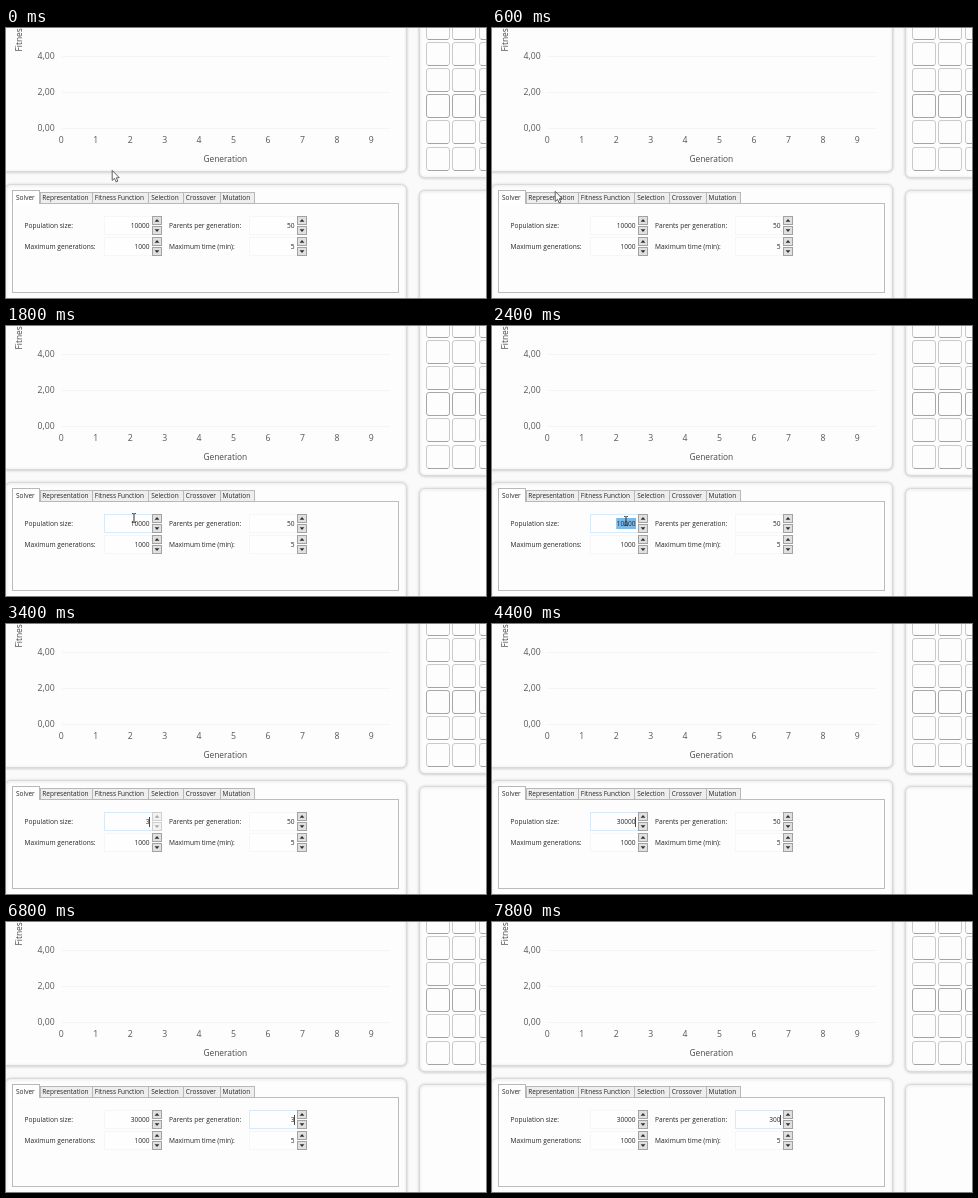
An HTML page with a canvas for the animation above (8 s loop, 480 px wide and 270 px high).

```html
<!DOCTYPE html>
<html lang="en">
<head>
<meta charset="utf-8">
<title>Solver settings</title>
<style>
  html, body { margin: 0; width: 100%; height: 100%; overflow: hidden; background: #fbfbfb; }
  canvas { display: block; width: 480px; height: 270px; }
</style>
</head>
<body>
<canvas id="stage" width="480" height="270"></canvas>
<script>
const ctx = document.getElementById('stage').getContext('2d');
const LOOP = 8000;
const FONT = '"Open Sans", "Noto Sans", sans-serif';

// Each track lists [start ms, value]; values hold until the next entry.
const pointer = [
  [0, ['arrow', 106, 142]], [200, ['arrow', 70, 157]], [400, ['arrow', 65, 161]],
  [600, ['arrow', 63, 163]], [1200, ['arrow', 66, 166]], [1400, ['arrow', 72, 171]],
  [1600, ['arrow', 110, 187]], [1800, ['beam', 128, 187]], [2000, ['beam', 133, 190]],
  [2200, ['beam', 134, 190]], [3400, null], [5200, ['arrow', 146, 193]],
  [5400, ['arrow', 219, 205]], [5600, ['beam', 272, 191]], [6800, null]
];
const population = [[0, '10000'], [3400, '3'], [3800, '30'], [4000, '3000'], [4400, '30000']];
const parents = [[0, '50'], [6800, '3'], [7200, '30'], [7400, '300']];
const popCaret = [[0, false], [3400, true], [4000, false], [4400, true], [5000, false], [5600, true], [5800, false]];
const parCaret = [[0, false], [6800, true], [7400, false], [7800, true]];

const tabs = [
  ['Solver', 6, 34], ['Representation', 34, 86], ['Fitness Function', 86, 142],
  ['Selection', 142, 177], ['Crossover', 177, 214], ['Mutation', 214, 248]
];

function at(track, t) {
  let value = track[0][1];
  for (const [start, v] of track) if (t >= start) value = v;
  return value;
}

const within = (t, a, b) => t >= a && t < b;

function text(str, x, y, size = 6.6, align = 'left', color = '#262626') {
  ctx.font = `${size}px ${FONT}`;
  ctx.textAlign = align;
  ctx.fillStyle = color;
  ctx.fillText(str, x, y);
}

// Box with a crisp one-pixel border inside the given bounds.
function box(x, y, w, h, fill, border) {
  ctx.fillStyle = border;
  ctx.fillRect(x, y, w, h);
  ctx.fillStyle = fill;
  ctx.fillRect(x + 1, y + 1, w - 2, h - 2);
}

function roundBox(x, y, w, h, r, fill, border) {
  ctx.beginPath();
  ctx.roundRect(x + 0.5, y + 0.5, w - 1, h - 1, r);
  ctx.fillStyle = fill;
  ctx.fill();
  ctx.strokeStyle = border;
  ctx.lineWidth = 1;
  ctx.stroke();
}

function card(x, y, w, h) {
  ctx.save();
  ctx.shadowColor = 'rgba(0,0,0,0.18)';
  ctx.shadowBlur = 3;
  ctx.shadowOffsetY = 0.5;
  roundBox(x, y, w, h, 5, '#fdfdfd', '#dadada');
  ctx.restore();
}

function chart() {
  ['4,00', '2,00', '0,00'].forEach((label, i) => {
    const y = 28 + i * 36;
    ctx.fillStyle = '#f4f4f4';
    ctx.fillRect(56, y, 328, 1);
    text(label, 48.6, y + 3, 8.7, 'right', '#555555');
  });
  for (let i = 0; i < 10; i++) text(i, 55.3 + i * 34.45, 115, 8.7, 'center', '#555555');
  text('Generation', 219.3, 134, 8.4, 'center', '#484848');
  ctx.save();
  ctx.translate(16, 23.5);
  ctx.rotate(-Math.PI / 2);
  text('Fitness', 0, 0, 8.4, 'left', '#484848');
  ctx.restore();
}

function cells() {
  for (let row = 0; row < 6; row++) {
    for (let col = 0; col < 3; col++) {
      const x = 420 + Math.round(col * 26.4), y = Math.round(-12 + row * 26.1);
      roundBox(x, y, 24, 24, 2.5, '#fdfdfd', row === 3 ? '#a8a8a8' : '#cacaca');
      ctx.fillStyle = '#a4a4a4';
      ctx.fillRect(x + 2, y + 23, 20, 1);
    }
  }
}

function tab([label, x1, x2], selected, hover) {
  const top = selected ? 162 : 164;
  let fill = selected ? '#fefefe' : '#eeeeee';
  if (hover) {
    fill = ctx.createLinearGradient(0, 164, 0, 176);
    fill.addColorStop(0, '#ecf4fc');
    fill.addColorStop(1, '#d9eafb');
  }
  box(x1, top, x2 - x1 + (selected ? 0 : 1), 176 - top, fill, hover ? '#86b7e6' : '#b8b8b8');
  if (selected) {
    ctx.fillStyle = '#fefefe';
    ctx.fillRect(x1 + 1, 175, x2 - x1 - 2, 2);
  }
  text(label, (x1 + x2) / 2 - 0.6, selected ? 171.6 : 172.2, 6.5, 'center');
}

function spinner(x, y, dim) {
  for (const dir of [-1, 1]) {
    const top = dir < 0 ? y : y + 10;
    box(x, top, 10, 9, dim ? '#f2f2f2' : '#e0e0e0', dim ? '#cfcfcf' : '#a2a2a2');
    const mid = top + 4.5;
    ctx.beginPath();
    ctx.moveTo(x + 2.6, mid - dir * 1.3);
    ctx.lineTo(x + 7.4, mid - dir * 1.3);
    ctx.lineTo(x + 5, mid + dir * 1.4);
    ctx.fillStyle = dim ? '#a8a8a8' : '#303030';
    ctx.fill();
  }
}

function field(x, y, value, { focus, selected, caret, dim } = {}) {
  const right = x + 46;
  box(x, y, 49, 19, '#fefefe', focus ? '#d8eafa' : '#f6f6f6');
  if (selected) {
    const w = value.length * 3.75 + 1;
    ctx.fillStyle = '#7abaea';
    ctx.fillRect(right - w, y + 4, w, 11);
  }
  text(value, right - 0.5, y + 12, 6.6, 'right');
  if (caret) {
    ctx.fillStyle = '#484848';
    ctx.fillRect(right - 1, y + 5, 1, 10);
  }
  spinner(x + 48, y, dim);
}

function arrow(x, y) {
  const pts = [[0, 0], [0, 10], [2.3, 8], [4, 11.5], [5.7, 10.7], [4.1, 7.4], [7, 7.2]];
  ctx.beginPath();
  for (const [dx, dy] of pts) ctx.lineTo(x + 0.2 + dx, y + 0.4 + dy);
  ctx.closePath();
  ctx.fillStyle = '#ffffff';
  ctx.fill();
  ctx.strokeStyle = '#3a3a3a';
  ctx.lineWidth = 0.8;
  ctx.stroke();
}

function beam(x, y) {
  ctx.fillStyle = '#2c2c2c';
  ctx.fillRect(x - 0.5, y + 0.5, 1, 9);
  for (const dy of [0, 9.2]) {
    ctx.fillRect(x - 2, y + dy, 1.6, 0.8);
    ctx.fillRect(x + 0.4, y + dy, 1.6, 0.8);
  }
}

function draw(t) {
  ctx.fillStyle = '#fafafa';
  ctx.fillRect(0, 0, 480, 270);
  card(-8, -20, 409, 164);
  card(413, -20, 90, 170);
  card(-1, 156, 402, 130);
  card(413, 162, 90, 130);
  chart();
  cells();

  box(6, 175, 387, 90, '#fdfdfd', '#bcbcbc');
  const hover = within(t, 1200, 1600);
  for (let i = tabs.length - 1; i >= 0; i--) if (i !== 1) tab(tabs[i], i === 0, false);
  tab(tabs[1], false, hover);

  text('Population size:', 18.6, 200.4);
  text('Maximum generations:', 18.6, 221.2);
  text('Parents per generation:', 163, 200.4);
  text('Maximum time (min):', 163, 221.2);

  field(98, 188, at(population, t), {
    focus: within(t, 1800, 5800),
    selected: within(t, 2400, 3400),
    caret: at(popCaret, t),
    dim: within(t, 3400, 3800)
  });
  field(98, 209, '1000');
  field(243, 188, at(parents, t), {
    focus: t >= 5600,
    selected: within(t, 5800, 6800),
    caret: at(parCaret, t)
  });
  field(243, 209, '5');

  const p = at(pointer, t);
  if (p) (p[0] === 'arrow' ? arrow : beam)(p[1], p[2]);
}

const start = performance.now();
function tick() {
  draw((performance.now() - start) % LOOP);
  requestAnimationFrame(tick);
}
tick();
</script>
</body>
</html>
```
